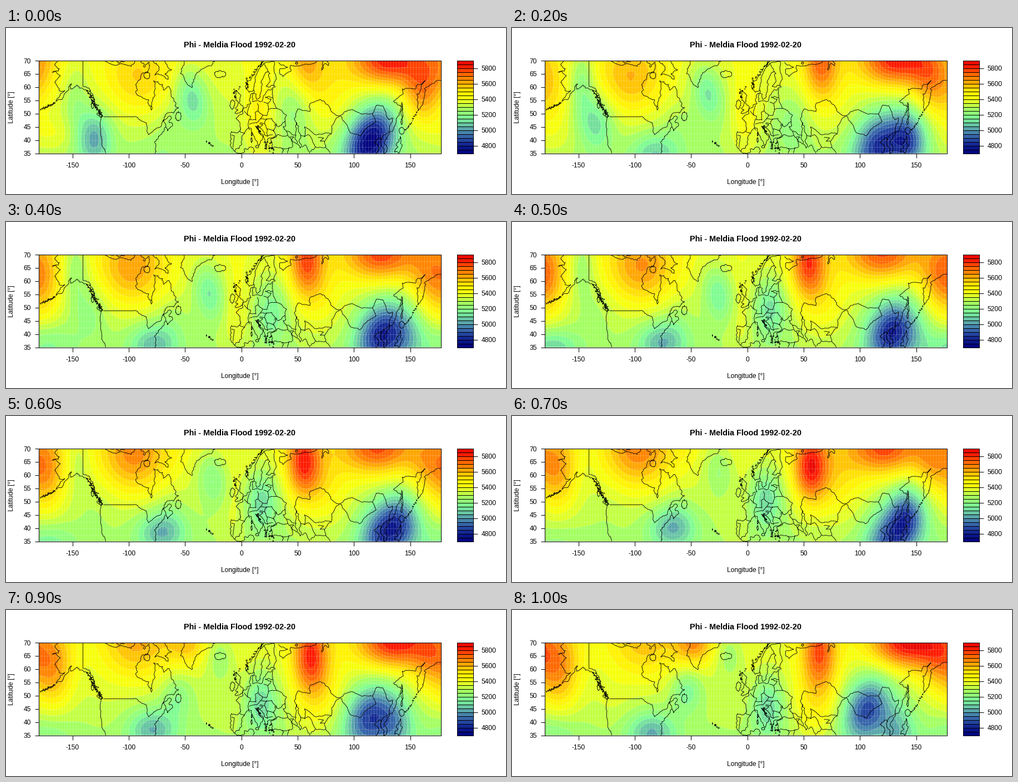
Recreate the animation shown at these times as a matplotlib script. Size 900x300 px, loop 1.1 s.

```python
import numpy as np
import matplotlib.pyplot as plt
from matplotlib.animation import ArtistAnimation
from matplotlib.collections import LineCollection
from matplotlib.colors import LinearSegmentedColormap

plt.rcParams["font.family"] = "Liberation Sans"
W, H, DPI = 900, 300, 100
PX = 72 / DPI
STEPS, STEP_MS = 11, 100
LEFT, RIGHT, TOP, BOTTOM = 59.2, 783.2, 59, 226.5
LOW, HIGH = 4700, 5900
LEVELS = np.arange(LOW, HIGH + 1, 50)
SCALE = np.array([2.026, 4.786])  # pixels per degree
rng = np.random.default_rng(7)

lon = np.arange(-180, 178, 2.5)
lat = np.arange(35, 71, 2.5)
X, Y = np.meshgrid(lon, lat)

cmap = LinearSegmentedColormap.from_list("phi", [
    (0, "#00007c"), (.08, "#0c1a8c"), (.17, "#2c55a8"), (.25, "#5296ae"),
    (.33, "#6cd0a0"), (.40, "#80ff90"), (.48, "#a4ff60"), (.56, "#e0ff28"),
    (.62, "#ffff00"), (.69, "#ffe000"), (.77, "#ffa800"), (.86, "#ff6400"),
    (.94, "#ff1c00"), (1, "#e00000")])

# Pressure systems drift through (lon, lat, strength) at these steps
KEYS = [0, 2, 5, 7, 10]
systems = []


def system(width, height, *path, tilt=0):
    systems.append((width, height, tilt, np.array(path).T))


# Lows
system(11, 7.5, (-131, 41, -290), (-134, 47, -210), (-134, 50, -50),
       (-125, 48, -20), (-120, 48, 30))
system(8, 9, (-147, 56, -90), (-147, 62, -180), (-147, 66, -130),
       (-144, 66, -40), (-140, 66, 0))
system(10, 7.5, (-44, 56, -240), (-35, 58, -220), (-25, 55, -210),
       (-25, 62, -130), (-16, 66, -130), tilt=-.3)
system(10, 6, (-62, 46, -50), (-62, 46, -50), (-62, 46, -50),
       (-62, 46, -50), (-54, 52, -180))
system(11, 8, (48, 53, -130), (40, 47, -110), (20, 50, -210),
       (16, 51, -230), (18, 46, -220))
system(15, 9, (113, 39, -570), (115, 38, -450), (127, 41, -500),
       (126, 36, -390), (106, 45, -450), tilt=.4)
system(12, 8, (128, 46, -100), (143, 40, -410), (148, 38, -110),
       (143, 45, -330), (134, 36, -220))
system(15, 5.5, (-75, 35, -40), (-82, 35, -200), (-76, 37, -260),
       (-67, 40, -250), (-85, 36, -260))
system(17, 5, (-168, 42, 90), (-172, 40, 40), (-174, 35, -200),
       (-170, 35, -60), (-174, 36, -110))

# Ridges
system(13, 11, (-180, 70, 200), (-176, 58, 160), (-180, 62, 330),
       (-169, 62, 270), (-167, 60, 290))
system(22, 10, (-92, 63, 180), (-104, 63, 230), (-94, 65, 280),
       (-97, 69, 300), (-92, 70, 190))
system(13, 6, (-48, 70, 0), (-48, 70, 0), (-48, 70, 0),
       (-48, 70, 20), (-47, 70, 270))
system(10, 12, (16, 48, 140), (-2, 48, 110), (-7, 47, 80),
       (-7, 48, 50), (-3, 56, 40))
system(11, 9.5, (57, 70, 230), (65, 70, 320), (54, 67, 390),
       (56, 63, 460), (64, 67, 360))
system(16, 11, (77, 57, 110), (72, 57, 70), (68, 53, 110),
       (80, 58, 130), (62, 48, 160))
system(23, 7, (130, 70, 450), (132, 70, 450), (120, 70, 370),
       (122, 70, 390), (142, 70, 490))
system(12, 9, (160, 58, 270), (162, 62, 220), (162, 62, 110),
       (165, 66, 220), (170, 63, 200))


def field(i):
    z = 5340 + 3 * (Y - 52)
    for sx, sy, tilt, path in systems:
        cx, cy, amp = (np.interp(i, KEYS, p) for p in path)
        dy = Y - cy
        dx = (X - cx - tilt * dy + 180) % 360 - 180
        z = z + amp * np.exp(-.5 * ((dx / sx) ** 2 + (dy / sy) ** 2))
    return np.clip(z, LOW + 1, HIGH - 1)


lines = []


def line(*pts, rough=.08, depth=3):
    """Line through (lon, lat) points, roughened by midpoint displacement."""
    p = np.array(pts) * SCALE
    for _ in range(depth):
        d = np.diff(p, axis=0)
        size = np.minimum(np.hypot(*d.T), 12)[:, None]
        q = np.empty((2 * len(p) - 1, 2))
        q[::2] = p
        q[1::2] = p[:-1] + d / 2 + rng.normal(0, rough, d.shape) * size
        p = q
    lines.append(p / SCALE)


def coast(*pts):
    line(*pts, rough=.15)


def blob(x, y, rx, ry, lean=0):
    """Rough closed outline: an island or an inland sea."""
    a = np.linspace(0, 2 * np.pi, 9)
    coast(*np.c_[x + rx * np.cos(a) + lean * np.sin(a), y + ry * np.sin(a)])


def islets(n, spread, *pts):
    """Scatter small islets along a path."""
    xs, ys = np.array(pts).T
    at, k = np.linspace(0, len(pts) - 1, n), np.arange(len(pts))
    a = np.linspace(0, 2 * np.pi, 7)
    for c in np.c_[np.interp(at, k, xs), np.interp(at, k, ys)] * SCALE:
        r = rng.uniform(.3, 1.6, 2)
        c = c + rng.normal(0, spread, 2)
        lines.append((c + np.c_[np.cos(a), np.sin(a)] * r) / SCALE)


# North America
coast((-162.5, 70), (-166, 68.5), (-161.8, 67), (-168, 65.6), (-161, 64.4),
      (-166, 61.8), (-162, 58.7), (-157.2, 58.7), (-164.8, 54.6), (-158, 56.5),
      (-153.3, 59.4), (-150.8, 61.2), (-151.8, 59.2), (-146, 60.8), (-138, 59),
      (-133.5, 56.5), (-130, 54), (-127, 51), (-123, 49))
islets(16, .8, (-178, 51.7), (-172, 52.6), (-166, 54))
islets(44, 2, (-136, 58.2), (-131, 54), (-124, 49.3))
blob(-132.2, 53, .9, 1.1)
blob(-126, 49.5, 1.8, .8, -1.5)
line((-141, 70), (-141, 60.3), depth=0)
line((-141, 60.3), (-135.5, 59.7), (-131.8, 56.6), (-130.2, 55))
line((-123, 49), (-95, 49), depth=0)
line((-95, 49), (-84.5, 46.5), (-82.5, 42), (-76, 44.3), (-71.5, 45), (-69, 47.4),
     (-67, 45))
coast((-123, 49), (-124.7, 48.4), (-124.2, 40), (-120.6, 35))
coast((-122, 70), (-113.5, 68.3), (-105, 68.7), (-98, 67.8), (-94, 70))
coast((-117, 70), (-109, 69), (-102, 70))
coast((-89, 70), (-86, 67.5), (-82, 69.4), (-82, 67), (-87, 65.5), (-94, 61),
      (-92.5, 57), (-82.3, 55.2), (-80, 51.3), (-76.7, 57), (-78, 62.4), (-70, 61),
      (-69, 58.8), (-64.5, 60.3), (-60, 55), (-55.8, 52.2), (-60, 50.2), (-66, 50.2),
      (-70, 47), (-65, 49), (-64, 46.5), (-61, 45.6), (-65.5, 43.5), (-67, 45),
      (-70.6, 42.5), (-74, 40.6), (-76, 38), (-75.8, 35.8), (-77, 35))
blob(-84, 64.4, 2.7, 1.3)
blob(-56, 49, 2.6, 1.8)
coast((-68, 70), (-62, 66.6), (-68, 65), (-65, 63), (-77, 64.5), (-73, 67.5), (-79, 70))

# North Atlantic
coast((-51, 70), (-53.5, 67), (-48, 61), (-43.5, 60), (-40, 65), (-26, 68.5), (-22, 70))
blob(-19, 64.9, 5, 1.4)
islets(5, .8, (-31, 39.3), (-25.3, 37.7))
coast((-5.5, 50.1), (1.3, 51.2), (1.6, 52.7), (-1.5, 55), (-2, 57.6), (-5, 58.5),
      (-5, 55), (-3, 54.5), (-5, 51.8), (-3, 51.4), (-5.5, 50.1))
blob(-8, 53.4, 2, 1.8)
islets(10, 1.5, (-6, 56), (-7, 58), (-1.3, 60.3))

# Europe
coast((-1.8, 43.4), (-9, 43.2), (-9.2, 38.7), (-8.9, 37), (-5.4, 36.1), (-2, 36.8),
      (0, 39.5), (3.1, 43), (8.8, 44.4), (16, 38), (18.4, 40), (12.4, 45.3),
      (19.4, 42), (22.5, 36.5), (23, 40.3), (29, 41), (28, 43.5), (31, 46.2),
      (33, 45), (39, 47), (37, 45), (41.5, 41.8), (31, 41.2), (26.5, 40.5), (27, 37),
      (36, 36.8), (36, 35))
coast((-1.8, 43.4), (-1.2, 46), (-4.7, 48.3), (1.5, 50.2), (5, 53.3), (8.5, 53.8),
      (8.2, 57), (10.6, 57.7), (10, 54.5), (18.5, 54.7), (21.5, 57.5), (23.5, 59),
      (30, 60), (22, 60.3), (25.4, 65.1), (22, 65.6), (17.3, 61.7), (16.5, 57),
      (13.5, 55.4), (11, 59), (7, 58), (5.2, 62), (13, 66), (20, 69.8))
islets(24, 1.5, (5, 60), (5.2, 62), (13, 66.5), (20, 70))
islets(16, 3, (23, 39), (27, 36))
islets(10, 1.2, (14, 45), (17, 43))
blob(9, 40, .7, .9)
blob(9.1, 42.2, .4, .7)
blob(14, 37.5, 1.5, .5)
coast((-5.9, 35.8), (-2, 35.1), (3, 36.8), (10, 37.3), (10.2, 35))
line((11, 59), (12, 63.5), (16, 67), (20, 69), (24, 65.8))
line((20, 69), (29, 69.8), (29, 66.5), (31, 63), (28, 60.5))
line((-1.8, 43.4), (3.1, 42.4))
line((-8.7, 42), (-6.3, 41.6), (-7.4, 37.2))
line((2.5, 51), (8.2, 49), (6, 46.2), (7.5, 43.8))
line((7.5, 47.6), (13, 47.6), (12.2, 50.3), (14.8, 51), (14.3, 53.9))
line((7, 45.9), (13.7, 46.5), (17, 48), (18.8, 49.5), (14.8, 51))
line((7, 53.3), (6, 51.5), (5.8, 49.5))
line((17, 48), (22.8, 48), (20.3, 46.2), (16.5, 46.5))
line((18.8, 49.5), (22.5, 49.2), (24, 51), (23.5, 53.9), (19.8, 54.4))
line((23.5, 53.9), (26.5, 55.5), (21.2, 56.2), (28, 56), (27.5, 58), (28, 59.5))
line((28, 56), (31.5, 52), (24, 51.6))
line((31.5, 52), (40, 49.5), (38.5, 47))
line((22.8, 48), (27, 48.2), (30, 46.3), (29.6, 45.2))
line((20.3, 46.2), (22.5, 44.2), (28.5, 43.8))
line((22.5, 44.2), (23, 41.4), (28, 42))
line((16, 46.2), (19, 45.8), (16, 44.8), (20.5, 42), (23, 41.4))
line((36, 36.8), (44.8, 37.2), (44.5, 39.8), (41.5, 41.6))
line((40, 43.5), (48.5, 41.8))
line((43, 41.2), (46.5, 41.2), (45, 40), (48.8, 38.4))
line((42.5, 37.2), (41, 35))

# Western and central Asia
coast((33, 69.4), (41, 67.5), (34, 66.8), (37, 64), (44, 66), (44, 68.3), (54, 68.4),
      (65, 69), (67, 70))
coast((72.5, 70), (71.5, 66.4), (74.5, 69), (77.5, 68.2), (75, 70))
blob(49, 69.1, 1, .4)
line((49, 46.4), (47, 48), (50, 51.7), (61, 50.8), (61, 53.8), (70, 55.3), (77, 53.3),
     (80, 50.8), (87, 49.2))
blob(50.5, 41.8, 2, 4.8, -1.5)
line((52.5, 41.8), (56, 41.3), (56, 45), (66, 42), (80, 42.3), (80.3, 45), (87.5, 49.2))
line((56, 41.3), (60, 42), (66, 37.4), (61.2, 35.6))
line((54, 37.3), (57, 38.2), (61, 35))
line((66, 37.4), (75, 37.3), (73.8, 39.5), (80, 42.3))
line((68, 41), (73, 40.8), (70, 39.6), (73.8, 39.5))
line((75, 37.3), (79, 35))

# Eastern Asia
line((87.5, 49.2), (92, 50.8), (98.5, 51.5), (107, 49.8), (116.7, 49.8), (119.8, 47),
     (112, 45), (105, 41.6), (97, 42.7), (87.5, 49.2))
line((116.7, 49.8), (120, 53.2), (125.5, 53), (131, 47.7), (134.7, 48.3), (131, 43),
     (124.4, 40))
coast((119.3, 35), (122.4, 37), (118, 39.2), (121.9, 40.8), (124.4, 40), (126.5, 37),
      (126.5, 35), (129.4, 36), (127.5, 39.8), (135.5, 44.5), (140.5, 49.5), (141, 53.2),
      (135.2, 54.7), (143, 59.3), (155, 59.3), (163.2, 62.5), (156, 57.5), (156.7, 51),
      (162, 55), (164, 59.9), (177.5, 62.5))
blob(142.6, 50, .7, 4.2)
blob(142.5, 43.5, 2.3, 1.4)
coast((141, 41.3), (142, 39.5), (140, 35), (136, 35.5), (140, 39.5), (141, 41.3))
islets(11, .5, (146, 44), (151, 46.5), (156, 50.5))


def panel(x0, x1, side):
    ax = fig.add_axes([x0 / W, 1 - BOTTOM / H, (x1 - x0) / W, (BOTTOM - TOP) / H])
    ax.tick_params(length=7.5 * PX, width=PX, labelsize=12 * PX)
    ax.tick_params(axis="x", pad=9 * PX)
    ax.tick_params(axis="y", pad=7 * PX, left=side == "left", right=side == "right",
                   labelleft=side == "left", labelright=side == "right")
    for s in ax.spines.values():
        s.set_linewidth(PX)
    return ax


def label(x, y, s, size=12, **kw):
    fig.text(x / W, 1 - y / H, s, size=size * PX, ha="center", **kw)


fig = plt.figure(figsize=(W / DPI, H / DPI), dpi=DPI, facecolor="white")
ax = panel(LEFT, RIGHT, "left")
key = panel(812, 841, "right")
key.pcolormesh([0, 1], LEVELS, LEVELS[:-1, None] + 25, cmap=cmap, vmin=LOW,
               vmax=HIGH, edgecolors="black", linewidth=PX)
key.set(xticks=[], yticks=range(4800, 5801, 200), xlim=(0, 1), ylim=(LOW, HIGH))

label(421, 35, "Phi - Meldia Flood 1992-02-20", 14.4, weight="bold")
label(421, 282, "Longitude [°]")
label(10.5, 143, "Latitude [°]", rotation=90, va="center")

# Pale mesh of the 2.5 degree cells
mesh = dict(colors="white", linewidth=.5 * PX, alpha=.35, zorder=1.5)
ax.vlines(lon, 35, 70, **mesh)
ax.hlines(lat, -180, 177.5, **mesh)
ax.add_collection(LineCollection(lines, colors="black", linewidths=.85 * PX, zorder=2),
                  autolim=False)

frames = [[ax.contourf(X, Y, field(i), levels=LEVELS, cmap=cmap, vmin=LOW,
                       vmax=HIGH, antialiased=True, zorder=1)]
          for i in range(STEPS)]
ticks = range(-150, 151, 50)
ax.set(xlim=(-180, 177.5), ylim=(35, 70), yticks=range(35, 71, 5))
ax.set_xticks(ticks, [str(v) for v in ticks])

anim = ArtistAnimation(fig, frames, interval=STEP_MS, repeat=True, repeat_delay=0)
plt.show()
```
